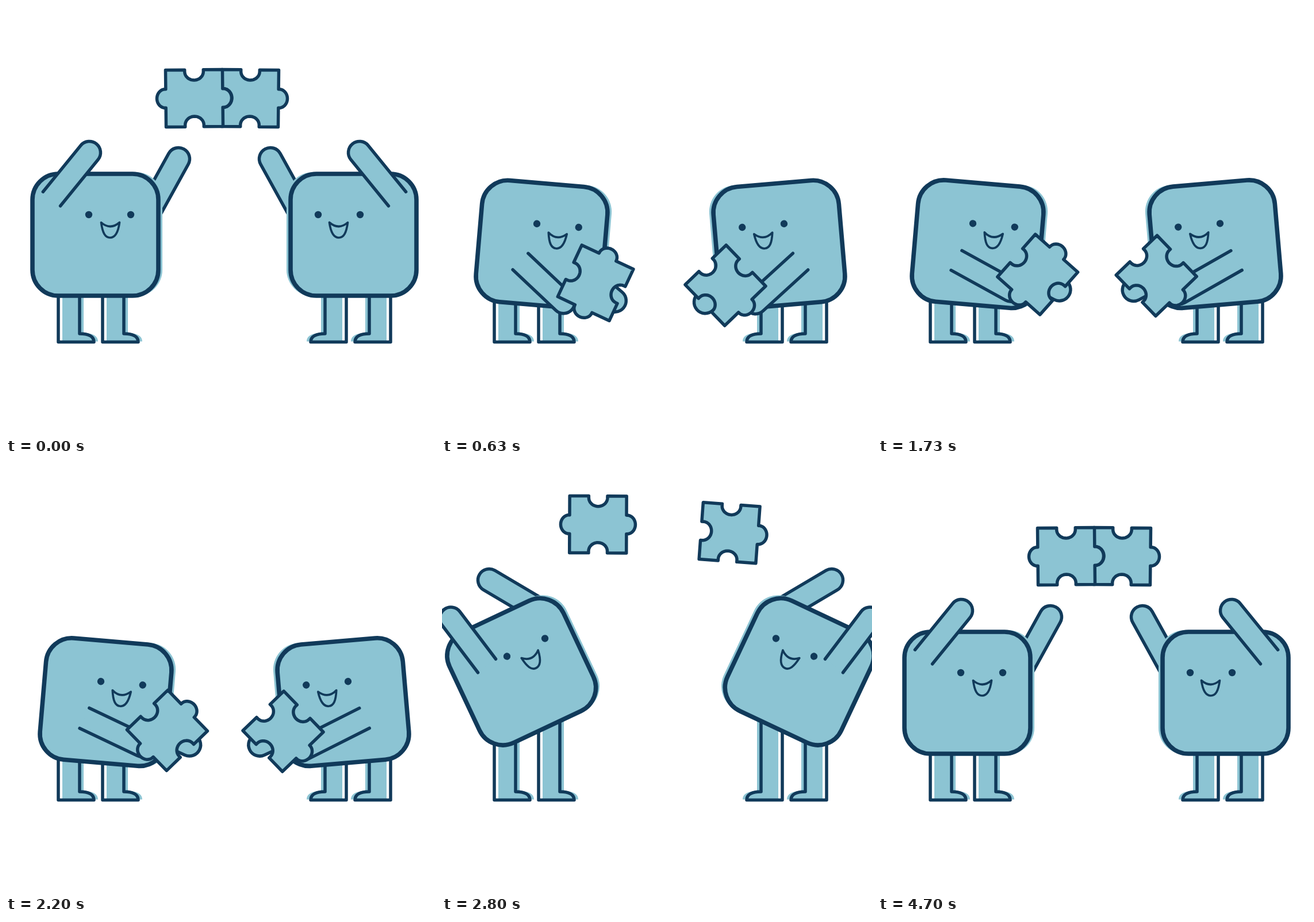
These frames come from a looping animation (748 by 748 pixels, 5.06 s). An HTML page with a canvas:

```html
<!DOCTYPE html>
<html lang="en">
<head>
<meta charset="utf-8">
<title>Puzzle friends</title>
<style>
  html, body { margin: 0; width: 100%; height: 100%; overflow: hidden; background: #fff; }
  canvas { display: block; }
</style>
</head>
<body>
<canvas id="stage" width="748" height="748"></canvas>
<script>
const ctx = document.getElementById('stage').getContext('2d');
const FILL = '#8cc4d3', INK = '#113a5a';
const LOOP = 5060, ARM_R = 19.5, MIRROR = 760;
const RAD = Math.PI / 180, LINE = 5.5, BODY_LINE = 7.6;

const clamp = v => Math.min(1, Math.max(0, v));
const span = (t, a, b) => clamp((t - a) / (b - a));
const sine = u => 0.5 - 0.5 * Math.cos(Math.PI * u);
const lerp = (a, b, u) => a + (b - a) * u;
const mix = (a, b, u) => a.map((v, i) => lerp(v, b[i], u));

// Pose: body x, y, angle; then for near and far arm: base x, y, angle, length
const arm = (x, y, hx, hy) => [x, y, Math.atan2(hy - y, hx - x), Math.hypot(hx - x, hy - y)];
const LEAN = [138.3, 361.3, -25.2 * RAD, ...arm(78, 351, 15.5, 268.5), ...arm(185, 263, 82, 202)];
const CHEER = [155.5, 398, 0, ...arm(79.5, 335.5, 145, 255), ...arm(242, 371, 300, 266)];

// Hand positions while holding: x, y at the start and their drift
const LEFT = { near: [207, 520, 30, -31], far: [297.5, 517, 22, -29] };
const RIGHT = { near: [210, 520, 32, -25.5], far: [299, 520, 20, -32] };

function holdPose(side, h) {
  const hand = ([x, y, dx, dy]) => [x + dx * h, y + dy * h];
  return [173.5, 414.7 - 0.6 * h, 4.9 * RAD,
    ...arm(136.5, 445 - 3 * h, ...hand(side.near)),
    ...arm(215, 440, ...hand(side.far))];
}

function paint(path, width, fill = path) {
  ctx.fillStyle = FILL;
  ctx.strokeStyle = INK;
  ctx.lineWidth = width;
  ctx.lineJoin = ctx.lineCap = 'round';
  if (fill) ctx.fill(fill);
  ctx.stroke(path);
}

function at(x, y, angle, draw) {
  ctx.save();
  ctx.translate(x, y);
  ctx.rotate(angle);
  draw();
  ctx.restore();
}

function roundBox(x, y, w, h, r) {
  const path = new Path2D();
  path.roundRect(x, y, w, h, r);
  return path;
}

const bodyLine = roundBox(-109.5, -106, 219, 212, 45);
const bodyFill = roundBox(-109.5, -109, 226, 216, 46);
const mouth = new Path2D('M10-21.5Q25.5-7.5 42-21.5C39.5-3 34 5 25.5 5S12.5-3 10-21.5Z');
const leg = new Path2D('M0 440V584.5H62C62 575 53 570 37 570V440');

// One piece; each side (top, right, bottom, left) is 1 for a tab, -1 for a notch
function makePiece(sides) {
  const path = new Path2D();
  const h = 49.5, k = 16.3;
  sides.forEach((type, i) => {
    const c = [1, 0, -1, 0][i], s = [0, 1, 0, -1][i];
    const put = (x, y) => path.lineTo(x * c - y * s, x * s + y * c);
    const neck = type > 0 ? -1 : 3, depth = type > 0 ? -14.5 : 15;
    put(-h, -h);
    put(-k, -h);
    for (let a = 0; a <= 20; a++) {
      const q = a / 20 * Math.PI;
      put(-k * Math.cos(q), -h + neck + depth * Math.sin(q));
    }
    put(k, -h);
    put(h, -h);
  });
  path.closePath();
  return path;
}
const leftPiece = makePiece([-1, 1, -1, 1]);
const rightPiece = makePiece([-1, 1, -1, -1]);

function drawArm(x, y, angle, length) {
  const path = new Path2D();
  path.moveTo(0, -ARM_R);
  path.arc(length, 0, ARM_R, -Math.PI / 2, Math.PI / 2);
  path.lineTo(0, ARM_R);
  at(x, y, angle, () => paint(path, LINE));
}

function drawLeg(x) {
  ctx.fillStyle = FILL;
  at(x + 7, -1, 0, () => ctx.fill(leg));
  at(x, 0, 0, () => paint(leg, LINE, null));
}

function drawFriend(pose) {
  drawArm(...pose.slice(7));
  drawLeg(91);
  drawLeg(168);
  at(pose[0], pose[1], pose[2], () => {
    paint(bodyLine, BODY_LINE, bodyFill);
    paint(mouth, 3.7);
    ctx.fillStyle = INK;
    for (const x of [-11.5, 61.5]) {
      ctx.beginPath();
      ctx.arc(x, -35, 6.2, 0, 7);
      ctx.fill();
    }
  });
  drawArm(...pose.slice(3, 7));
}

function friendPose(side, t, h) {
  const thrown = mix(holdPose(side, h), LEAN, sine(span(t, 2400, 2800)));
  return mix(thrown, CHEER, sine(span(t, 2830, 3200)));
}

// Places are x, y, angle in degrees
function drawPiece(path, held, apex, joined, t) {
  const u = span(t, 2300, 3010);
  const up = mix(held, apex, 1 - (1 - u * u) ** 4);
  const inward = sine(span(t, 2790, 3200)), drop = span(t, 2970, 3200) ** 2;
  at(lerp(up[0], joined[0], inward), lerp(up[1], joined[1], drop),
    lerp(up[2], joined[2], inward) * RAD, () => paint(path, LINE));
}

function render(time) {
  let t = time % LOOP;
  t -= t % 100 - (t % 100 < 30 ? 0 : 30);
  if (t < 30) t = LOOP; // opens on the finished pose, then cuts to holding
  const h = sine(span(t, 30, 2400));

  ctx.fillStyle = '#fff';
  ctx.fillRect(0, 0, 748, 748);
  drawFriend(friendPose(LEFT, t, h));
  ctx.save();
  ctx.translate(MIRROR, 0);
  ctx.scale(-1, 1);
  drawFriend(friendPose(RIGHT, t, h));
  ctx.restore();

  drawPiece(rightPiece, [495 - 13.2 * h, 489.8 - 25.2 * h, 46],
    [501.5, 96, 1.3], [424.5, 160.5, 0.6], t);
  drawPiece(leftPiece, [264.7 + 16 * h, 485 - 22 * h, 25 * h - 68.7],
    [270.7, 80.5, 3.3], [327.5, 160.5, -0.6], t);
}

function tick(now) {
  render(now - start);
  requestAnimationFrame(tick);
}
const start = performance.now();
render(0);
requestAnimationFrame(now => tick(Math.max(now, start)));
</script>
</body>
</html>
```
